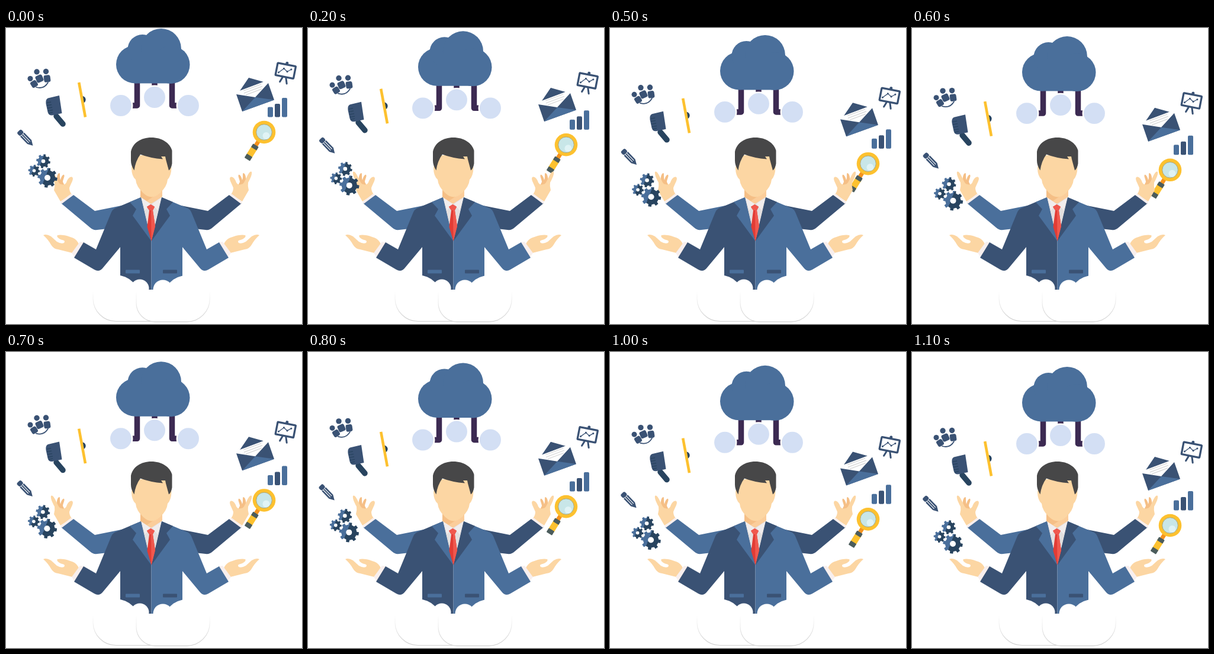
Recreate the animation shown at these times as an HTML page. Size 500 by 500 pixels, loop 3.1 s.

```html
<!DOCTYPE html>
<html lang="en">
<head>
<meta charset="utf-8">
<title>Busy businessman</title>
<style>
  html, body { margin: 0; width: 100%; height: 100%; overflow: hidden; background: #fff; }
  svg { display: block; width: 100%; height: 100%; }
  .navy { fill: #3a5274; }
  .blue { fill: #4a6f9b; }
  .deep { fill: #28445f; }
  .skin { fill: #fcd6a3; }
  .tan { fill: #f5bf86; }
  .gold { fill: #fdc12f; }
  .grey { fill: #4b5c5c; }
  .white { fill: #fff; }
  .cuff { fill: #f8efee; }
  .line { fill: none; stroke: #3a5274; stroke-linecap: round; stroke-linejoin: round; }
  .rim { fill: none; stroke: url(#fade); stroke-width: 1.2; }
</style>
</head>
<body>
<svg viewBox="0 0 500 500">
  <defs>
    <linearGradient id="split" x2="1" y2=".4">
      <stop offset=".5" stop-color="#4a6f9b"/>
      <stop offset=".5" stop-color="#28445f"/>
    </linearGradient>
    <linearGradient id="fade" gradientUnits="userSpaceOnUse" x1="0" y1="445" x2="0" y2="496">
      <stop offset="0" stop-color="#fff"/>
      <stop offset="1" stop-color="#cfcfcf"/>
    </linearGradient>
    <g id="hands">
      <path class="tan" d="M86 262C85 255 86 246 90 245C92 245 90 252 92 257C93 252 96 247 98 248C100 250 96 256 96 260L99 266L88 268Z"/>
      <path class="skin" d="M92 293L81 274Q83 267 82 261C78 254 75 247 76 243C78 241 81 245 83 249L88 259Q90 264 94 264Q99 266 102 261C104 255 108 250 112 252C115 255 110 262 107 270Q107 276 111 281Z"/>
      <path class="cuff" d="M92 294L110 280L114 282L94 297Z"/>
      <path class="skin" d="M63 350Q68 347 76 352L86 361Q93 365 98 363Q101 359 95 358C88 356 85 352 87 350C95 348 107 352 114 355Q120 358 123 365L112 380L88 374Q80 373 76 366Q71 357 63 350Z"/>
      <path class="cuff" d="M111 380L125 361L132 362L116 387Z"/>
    </g>
    <path id="backArm" d="M114 282L150 309L200 299L215 300L181 338L154 341Q147 342 142 337L93 296Z"/>
    <path id="frontArm" d="M228 286L209 294L183 305Q180 307 178 311L152 374L131 362L115 388L149 408Q157 413 163 406L193 370V442H245.5V360Z"/>
    <path id="lapel" d="M228 286L209 294L220 306L214 317L245.5 360Z"/>
  </defs>

  <g id="cloud">
    <path d="M221.5 90V131H208M251 90V110M280.5 90V131H294" fill="none" stroke="#3c2a52" stroke-width="9.5" stroke-linejoin="round"/>
    <g fill="#d3dff4" stroke="#fff" stroke-width="2.5">
      <circle cx="194" cy="131" r="19.2"/>
      <circle cx="251" cy="117" r="19.2"/>
      <circle cx="308" cy="131" r="19.2"/>
    </g>
    <g class="blue">
      <circle cx="218" cy="61.5" r="32"/>
      <circle cx="230.5" cy="36" r="25"/>
      <circle cx="262" cy="35" r="34"/>
      <circle cx="278.5" cy="62" r="32"/>
      <path d="M218 40H279V93.5H218Z"/>
    </g>
  </g>

  <g id="talk">
    <g class="navy">
      <circle cx="41" cy="85.5" r="4.5"/>
      <circle cx="52" cy="74" r="4.7"/>
      <circle cx="67.5" cy="73.5" r="4.7"/>
      <rect x="-5.5" y="-5.5" width="11" height="11" rx="3" transform="translate(47.5 94.5) rotate(-32)"/>
      <rect x="-6" y="-6" width="12" height="12" rx="3" transform="translate(56.5 85.5) rotate(-24)"/>
      <rect x="-5.5" y="-6" width="11" height="12" rx="3" transform="translate(69.5 85.5) rotate(-8)"/>
    </g>
    <path class="line" stroke-width="1.8" d="M51 100Q64 104 71 92"/>
    <path d="M85 149L96 162" stroke="#28445f" stroke-width="9.5" stroke-linecap="round"/>
    <path class="navy" d="M71 118.5L90 114L94.5 144L78 147.5Q72 148 70.5 142L67.5 128Q66.500 120 71 118.500Z"/>
    <path d="M68.5 126.5L76 125M69 131L77 129.5M70 135.5L78 134M71 140L79 138.5M72 144L79 142.5" stroke="#28445f" stroke-width="1.3"/>
    <path class="deep" d="M127.5 115A6 6 0 0 1 129.7 127Z"/>
    <path d="M123.2 92L134 150.5" stroke="#fdc12f" stroke-width="4.6"/>
  </g>

  <g id="post">
    <path class="navy" d="M410 84L435 91L395 106Z"/>
    <path class="white" d="M395 106L435 91L445 98L424 118L393 112Z"/>
    <path d="M401 106L431 95M402 110L433 98.5M405 113L432 103" stroke="#dcdcdc" stroke-width="1.5"/>
    <path class="navy" d="M389 112L421 117L443 93L453 121.5L399 141Z"/>
    <path class="blue" d="M399 141L421 117L453 121.5Z"/>
    <g transform="translate(472.3 72.2) rotate(11)">
      <path class="line" stroke-width="3" d="M-3 12L-6 20M3 12L6 21"/>
      <circle class="navy" cx="0" cy="-13" r="2.5"/>
      <rect x="-15.5" y="-10.5" width="31" height="21" rx="1" fill="#fff" stroke="#3a5274" stroke-width="3.3"/>
      <path class="line" stroke-width="1.3" d="M-11 5L-3.5 -3L3 1L9 -4"/>
      <g class="navy">
        <circle cx="-11" cy="5" r="1.5"/><circle cx="-3.5" cy="-3" r="1.5"/>
        <circle cx="3" cy="1" r="1.5"/><circle cx="9" cy="-4" r="1.5"/>
      </g>
    </g>
  </g>

  <g id="search">
    <rect class="blue" x="442" y="133.5" width="9" height="17" rx="2"/>
    <rect class="navy" x="454" y="128" width="9" height="22.5" rx="2"/>
    <rect class="blue" x="466" y="118" width="9" height="32.5" rx="2"/>
    <g transform="translate(436 176) rotate(32)">
      <rect x="-3.5" y="18" width="7" height="10" fill="#f5931f"/>
      <rect class="gold" x="-5.5" y="30" width="11" height="18"/>
      <rect class="grey" x="-5.5" y="26" width="11" height="7" rx="1"/>
      <rect class="grey" x="-5.5" y="46" width="11" height="8" rx="1"/>
    </g>
    <circle class="gold" cx="436" cy="176" r="19.3"/>
    <circle cx="436" cy="176" r="13.3" fill="#c8e6e8" stroke="#a9a77c"/>
    <circle cx="439.5" cy="182" r="6" fill="#e0f3f5"/>
  </g>

  <use href="#backArm" class="blue"/>
  <use href="#backArm" class="navy" transform="matrix(-1 0 0 1 491 0)"/>
  <use href="#hands"/>
  <use href="#hands" transform="matrix(-1 0 0 1 491 0)"/>

  <use href="#frontArm" class="navy"/>
  <use href="#frontArm" class="blue" transform="matrix(-1 0 0 1 491 0)"/>
  <path fill="#e3dfdf" d="M228 286H263L245.5 360Z"/>
  <path fill="#fbcd9a" d="M227 270H264V285L245 297L227 287Z"/>
  <path class="tan" d="M227 270H264V275L238 292L227 286Z"/>
  <path fill="#f1eded" d="M228 286L244 297L235 308ZM263 286L247 297L256 308Z"/>
  <use href="#lapel" class="blue"/>
  <use href="#lapel" class="navy" transform="matrix(-1 0 0 1 491 0)"/>
  <path fill="#e23c35" d="M238 302L244.5 298L251 302L248 308L252 335L245.5 360L238.5 336L242 308Z"/>
  <path fill="#f0584e" d="M238 302L244.5 298L251 302L248 308L252 335L245.5 360L245 308H242Z"/>

  <path class="skin" d="M217 215L212 236Q212 250 219 256Q220 268 232 279Q246 292 260 279Q272 268 273 256Q279 250 279.5 236L273 215Z"/>
  <path fill="#474748" d="M211 209C214 194 228 185 245.5 185C263 185 277 194 280.5 207V229Q279 238 275 240.5L270 222L269 217H262L265 221.5Q244 220 227 213.5Q219 224 216.5 240.5Q211 232 211 224Z"/>
  <rect class="blue" x="202" y="408.5" width="24" height="6" rx="1"/>
  <rect class="navy" x="265" y="408.5" width="24" height="6" rx="1"/>

  <g class="white">
    <circle cx="186.5" cy="456.5" r="39"/>
    <circle cx="226" cy="440" r="15.5"/>
    <path d="M186 442H250V495.5H186Z"/>
  </g>
  <path class="rim" d="M147 446V457A39 39 0 0 0 186 495.5H245"/>
  <g class="white">
    <circle cx="305" cy="457" r="39"/>
    <circle cx="265" cy="442" r="16.5"/>
    <path d="M220 442H305V496H252A32 32 0 0 1 220 464Z"/>
  </g>
  <path class="rim" d="M220 446V464A32 32 0 0 0 252 496.3H305A39 39 0 0 0 344.3 457V446"/>

  <g id="tools">
    <g transform="translate(21.5 174) rotate(46)">
      <rect class="navy" x="0" y="-4.8" width="8" height="9.6" rx="3"/>
      <path class="navy" d="M8.5 -4.8H26L34.5 0L26 4.8H8.5Z"/>
      <path d="M8 -1.6H26M8 1.6H26" stroke="#fff" stroke-width="1.1"/>
    </g>
  </g>
</svg>
<script>
  const STEP = 100, LAST = 11, LOOP = 3100;
  const $ = id => document.getElementById(id);

  // Total travel [x, y] of each floating group
  const travel = {
    cloud: [0, 24], talk: [0, 59], post: [0, 93],
    search: [0, 117], tools: [-1, 71]
  };

  function gear(cx, cy, r, hole, turn) {
    const pts = [], teeth = 8;
    const shape = [[-.28, .78], [-.2, 1], [.2, 1], [.28, .78]];
    for (let i = 0; i < teeth; i++) {
      for (const [a, k] of shape) {
        const ang = (i + a) * 2 * Math.PI / teeth + turn;
        pts.push((cx + r * k * Math.cos(ang)).toFixed(2) + ',' + (cy + r * k * Math.sin(ang)).toFixed(2));
      }
    }
    return `<polygon points="${pts.join(' ')}" fill="url(#split)"/>` +
      `<circle class="white" cx="${cx}" cy="${cy}" r="${hole}"/>`;
  }

  $('tools').insertAdjacentHTML('beforeend',
    gear(63, 225, 12, 3.3, .2) + gear(47.5, 241, 10, 2.8, .1) + gear(70, 253, 16.8, 5, .15));

  function draw(time) {
    const k = Math.min(LAST, Math.floor(time % LOOP / STEP)) / LAST;
    for (const id in travel) {
      const [x, y] = travel[id];
      $(id).setAttribute('transform', `translate(${x * k} ${y * k})`);
    }
  }

  function tick() {
    draw(performance.now());
    requestAnimationFrame(tick);
  }
  tick();
</script>
</body>
</html>
```
